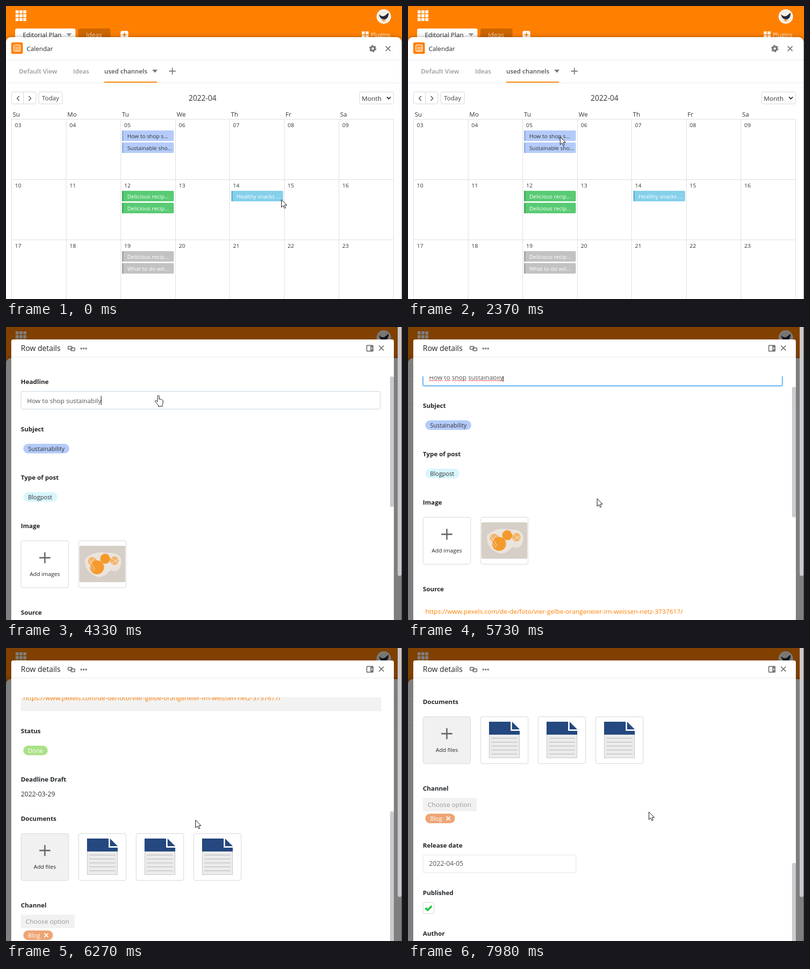
Recreate the animation shown at these times as an HTML page. Size 826 by 612 pixels, loop 8000 ms.

```html
<!DOCTYPE html>
<html lang="en">
<head>
<meta charset="utf-8">
<title>Calendar plugin</title>
<style>
  html, body { margin: 0; width: 100%; height: 100%; overflow: hidden; background: #fff; }
  svg { display: block; font-family: "Open Sans", "Noto Sans", sans-serif; }
  .raised { filter: drop-shadow(0 0 5px rgba(0, 0, 0, .35)); }
</style>
</head>
<body>
<svg id="stage" width="826" height="612" viewBox="0 0 826 612"></svg>
<script>
const ORANGE = '#ff8000', INK = '#212529', GREY = '#777', RULE = '#e9e9e9';

// SVG string helpers
const text = (x, y, s, size = 13, fill = INK, extra = '') =>
  `<text x="${x}" y="${y}" font-size="${size}" fill="${fill}" ${extra}>${s}</text>`;
const rect = (x, y, w, h, fill, r = 0, extra = '') =>
  `<rect x="${x}" y="${y}" width="${w}" height="${h}" rx="${r}" fill="${fill}" ${extra}/>`;
const frame = (x, y, w, h, stroke = '#d4d4d4', r = 3, fill = '#fff', extra = '') =>
  rect(x + .5, y + .5, w - 1, h - 1, fill, r, `stroke="${stroke}" ${extra}`);
const circle = (x, y, r, fill) => `<circle cx="${x}" cy="${y}" r="${r}" fill="${fill}"/>`;
const line = (d, stroke, width = 1, extra = '') =>
  `<path d="${d}" fill="none" stroke="${stroke}" stroke-width="${width}" ${extra}/>`;
const shape = (d, fill, extra = '') => `<path d="${d}" fill="${fill}" ${extra}/>`;
const plus = (x, y, r, stroke, width) => line(`M${x - r} ${y}h${2 * r}M${x} ${y - r}v${2 * r}`, stroke, width);
const cross = (x, y, r, stroke, width) =>
  line(`M${x - r} ${y - r}l${2 * r} ${2 * r}m0 ${-2 * r}l${-2 * r} ${2 * r}`, stroke, width);
const range = n => [...Array(n).keys()];
const grid = (x, y, n, pitch, size, fill) =>
  range(n * n).map(i => rect(x + i % n * pitch, y + Math.floor(i / n) * pitch, size, size, fill)).join('');
const bold = 'font-weight="700"', semi = 'font-weight="600"', medium = 'font-weight="500"';
const centered = 'text-anchor="middle"';

function topBar() {
  return rect(0, 0, 826, 80, ORANGE) + grid(20, 9, 3, 8, 6.4, '#fff') +
    circle(788, 22, 15, '#fff') + circle(788, 22, 13, '#f3ede3') +
    shape('M778 17q7 8 14 2l6-5q0 14-10 14-8 0-10-11z', '#23283a') +
    shape('M783 29q5-3 10 0l-5 4z', '#f0a04b') +
    rect(19, 47, 126, 30, '#fff', 4) + text(35, 65, 'Editorial Plan', 13.2) +
    shape('M126 57h11l-5.5 6.5z', '#999') +
    rect(151, 47, 67, 30, '#cc6600', 4) + text(167, 65, 'Ideas', 13.4, '#ffd9b3') +
    rect(239, 52, 16, 16, '#fff', 3) + plus(247, 60, 4.5, ORANGE, 2) +
    grid(742, 53, 2, 8, 6.5, '#fff3e6') + text(761, 65, 'Plugins', 12.2, '#fff3e6');
}

function calendarEvent(col, y, label, fill, edge, ink = '#fff') {
  const x = Math.round(14 + col * 114);
  return rect(x, y, 108, 22, fill, 2) + rect(x, y, 3, 22, edge, 1) +
    text(x + 11, y + 16, label, 11.45, ink, medium);
}

function calendar() {
  const column = i => Math.round(11 + i * 113.86);
  const days = ['Su', 'Mo', 'Tu', 'We', 'Th', 'Fr', 'Sa'];
  const blue = ['#b4cbfa', '#93aee0', '#333'], green = ['#59cb74', '#41a85a'];
  const grey = ['#c2c2c2', '#a3a3a3'], cyan = ['#85d0ea', '#62b4d0'];
  return topBar() +
    `<g class="raised">${rect(0, 65, 825, 600, '#fff', 10)}</g>` + rect(825, 66, 1, 546, '#8a8a8a') +
    rect(11, 76, 24, 24, ORANGE, 3) +
    frame(16, 81, 14, 14, '#fff', 2, 'none', 'stroke-width="1.6"') + grid(19.5, 85, 3, 3, 1.9, '#fff') +
    text(43, 94, 'Calendar', 13.1) +
    `<circle cx="765" cy="89" r="4.2" fill="none" stroke="${GREY}" stroke-width="3.6"/>` +
    `<circle cx="765" cy="89" r="6.2" fill="none" stroke="${GREY}" stroke-width="2.6" stroke-dasharray="3.25"/>` +
    cross(797, 89, 5, GREY, 1.8) + line('M0 112.5H825M0 160.5H825', RULE) +
    text(27, 141, 'Default View', 13.1, '#999', semi) + text(140, 141, 'Ideas', 13, '#999', semi) +
    text(205, 141, 'used channels', 13, '#555', semi) + shape('M305 133h11l-5.5 6.5z', GREY) +
    plus(347, 136, 7, GREY, 1.8) + rect(205, 158, 110, 2, ORANGE) +
    frame(11, 179, 52, 26) + line('M36.5 180v24', '#d4d4d4') +
    line('M27.5 188l-4.5 5 4.5 5M47.5 188l4.5 5-4.5 5', '#444', 1.4) +
    frame(68, 179, 50, 26) + text(75, 197, 'Today', 13, '#444') +
    text(410, 198, '2022-04', 15.4, '#333', centered) +
    frame(737, 179, 72, 26) + text(742, 198, 'Month', 13.3, '#333') +
    line('M794.5 190l4 4 4-4', '#333', 2) +
    days.map((d, i) => text(column(i) + 3, 231, d, 12.9, '#333')).join('') +
    line(range(8).map(i => `M${column(i) + .5} 236V612`).join('') +
      range(3).map(i => `M11 ${236.5 + i * 126}H809`).join(''), '#dcdcdc') +
    range(21).map(i => text(column(i % 7) + 7.5, 253 + Math.floor(i / 7) * 126,
      String(i + 3).padStart(2, '0'), 11.6, '#333')).join('') +
    calendarEvent(2, 260, 'How to shop s...', ...blue) +
    calendarEvent(2, 285, 'Sustainable sho...', ...blue) +
    calendarEvent(2, 386, 'Delicious recip...', ...green) +
    calendarEvent(2, 411, 'Delicious recip...', ...green) +
    calendarEvent(4, 386, 'Healthy snacks ...', ...cyan) +
    calendarEvent(2, 512, 'Delicious recip...', ...grey) +
    calendarEvent(2, 537, 'What to do wit...', ...grey);
}

function popover() {
  return `<g class="raised">${rect(222, 87, 203, 155, '#fff', 4)}${shape('M316 241h16l-8 8z', '#fff')}</g>` +
    text(238, 113, 'How to shop sustainabily', 12.2, INK, semi) + line('M222 126.5h203', RULE) +
    text(238, 152, '2022-04-05', 12.2, '#555') +
    rect(238, 171, 90, 20, '#b4cbfa', 10) + text(247, 186, 'Sustainability', 11.5) +
    rect(238, 205, 46, 20, '#eda575', 10) + text(248, 219, 'Blog', 11.5, '#fff');
}

const heading = (y, s) => text(31, y, s, 13, INK, bold);
const pill = (y, w, s, fill, ink = '#333', weight = '') =>
  rect(36, y, w, 20, fill, 10) + text(46, y + 15, s, 12.3, ink, weight);
const tile = (x, y, fill) => frame(x, y, 100, 99, '#dfdfdf', 4, fill, 'stroke-width="1.4"');
const addTile = (y, label, fill) => tile(31, y, fill) + plus(81, y + 36, 11.5, '#666', 2.8) +
  text(81, y + 74, label, 11.6, INK, centered);

function documentTile(x, y) {
  return tile(x, y) + `<g transform="translate(${x + 18} ${y + 11})">` +
    frame(0, 20, 64, 56, '#c4c4c4', 0, '#ebebeb') +
    shape('M0 0H45V19H64V27H0z', '#24487f') + shape('M48 0L64 16H48z', '#24487f') +
    line(range(5).map(i => `M5 ${34.5 + i * 8.2}h54`).join(''), '#b0b0b0') + '</g>';
}

function photo() {
  const orange = '#f49a2c';
  return tile(151, 446) + rect(153, 457, 96, 76, '#d6cfc8', 3) +
    shape('M165 484q20-18 45-12 34-2 30 22-4 22-22 14-18 22-36 10-20-12-17-34z', '#ebe4dc') +
    circle(180, 490, 9.5, '#f3b46a') + circle(226, 488, 9, '#f3b46a') +
    circle(207, 484, 10.5, orange) + circle(190, 502, 14.5, orange) +
    line('M168 488l16 22m-12-26l14 22m28-28l24 18m-30 6l28-18M172 500l14-18', '#f3ece5', 1);
}

function squiggle(from, to) {
  const steps = Math.floor((to - from) / 2);
  return `M${from} 162` + range(steps).map(i => `l2 ${i % 2 ? 2 : -2}`).join('');
}

function rowDetails() {
  const link = 'https://www.pexels.com/de-de/foto/vier-gelbe-orangeneier-im-weissen-netz-3737617/';
  return rect(0, 0, 826, 612, 'rgba(0,0,0,.5)') + rect(817, -8, 8, 528, '#c9c9ce', 4) +
    rect(11, 26, 798, 600, '#fff', 4) +
    text(31, 50, 'Row details', 15.6) +
    frame(129, 40, 9, 7, GREY, 1.5, 'none', 'stroke-width="2"') +
    frame(135, 43, 9, 7, GREY, 1.5, 'none', 'stroke-width="2"') +
    [157, 162, 167].map(x => circle(x, 45, 1.9, GREY)).join('') +
    frame(752, 38, 14, 13, GREY, 1, '#fff', 'stroke-width="2"') + rect(760, 38, 6, 13, GREY) +
    shape('M762 42l3 2.5-3 2.5z', '#fff') +
    cross(783, 44, 5, GREY, 1.8) + line('M11 62.5H809', RULE) +
    '<clipPath id="body"><rect x="11" y="103" width="798" height="509"/></clipPath>' +
    '<g clip-path="url(#body)"><g id="content">' +
    heading(119, 'Headline') + frame(31, 134, 750, 38, '#c6d4e0', 2) +
    `<g id="focus">${frame(30, 133, 752, 40, 'rgba(25,145,235,.25)', 3, 'none', 'stroke-width="3"')}` +
    frame(31, 134, 750, 38, '#1991eb', 2) +
    line(squiggle(44, 72) + squiggle(76, 88) + squiggle(92, 122) + squiggle(126, 199), '#e33', 1) + '</g>' +
    text(44, 159, 'How to shop sustainabily', 13.25, '#555') +
    `<rect id="caret" x="198" y="144" width="1" height="19" fill="#000"/>` +
    heading(218, 'Subject') + pill(244, 96, 'Sustainability', '#b4cbfa') +
    heading(319, 'Type of post') + pill(345, 71, 'Blogpost', '#d8f6fe') +
    heading(420, 'Image') + addTile(446, 'Add images', '#fff') + photo() +
    heading(601, 'Source') + `<g id="hover">${rect(31, 624, 752, 47, '#f2f2f2')}</g>` +
    text(36, 648, link, 13.45, ORANGE) +
    heading(717, 'Status') + pill(743, 51, 'Done', '#abe188', '#fff', medium) +
    heading(818, 'Deadline Draft') + text(31, 849, '2022-03-29', 13.7, '#333') +
    heading(900, 'Documents') + addTile(926, 'Add files', '#f1f1f1') +
    [151, 271, 391].map(x => documentTile(x, 926)).join('') +
    heading(1081, 'Channel') + rect(31, 1096, 112, 28, '#f1f1f1') +
    text(41, 1115, 'Choose option', 13.4, '#999') +
    pill(1129, 62, 'Blog', '#eda575', '#fff', medium) + cross(84, 1139, 4, '#fff', 1.8) +
    heading(1200, 'Release date') + frame(31, 1215, 320, 38, '#dfe2e6', 2) +
    text(44, 1238, '2022-04-05', 13.7, '#555') +
    heading(1299, 'Published') + frame(31, 1314, 24, 24, '#d4d4d4', 1) +
    line('M36.5 1326l4.5 4.5 8.5-8.5', '#23c73f', 4) +
    heading(1384, 'Author') + '</g>' +
    `<rect id="thumb" x="801" width="8" height="273" rx="4" fill="#c9cccf"/></g>`;
}

const arrowPath = 'M.5.5V16.5L4.3 13 6.7 18.5 9.2 17.5 6.9 12H11.8z';
const handPath = 'M6 14V2.5a1.75 1.75 0 0 1 3.5 0V9c.6-1 3-.8 3.2.7.8-.8 2.6-.4 2.7.9 1-.5 2.1.2 2.1 1.6V16' +
  'c0 2.5-1.5 3.5-1.5 6V23.5H7.5V21.5C6 19 2.2 15.5 1 13.3c-.6-1.5 1.2-2.4 2.4-1.3z';

stage.innerHTML = calendar() + `<g id="popup">${popover()}</g><g id="details">${rowDetails()}</g>` +
  `<g id="pointer" fill="#fff" stroke="#000"><path id="arrow" d="${arrowPath}"/><path id="hand" d="${handPath}"/></g>`;

const pointerSteps = [
  [0, 574, 404], [1400, 546, 380], [1550, 473, 351], [1700, 393, 326], [1850, 345, 298], [1970, 324, 281],
  [2090, 317, 273], [2980, 317, 232], [3100, 317, 199], [3250, 317, 175], [3370, 310, 153], [3490, 310, 146],
  [3770, 310, 142], [5340, 338, 205], [5460, 374, 292], [5580, 392, 343], [5730, 394, 358], [5850, 395, 359],
  [6940, 460, 346], [7060, 494, 341], [7180, 501, 342], [7980, 502, 342]];
const scrollSteps = [
  [0, 0], [5730, 49], [5850, 160], [6000, 300], [6120, 425], [6270, 539], [6390, 585], [6540, 600],
  [7180, 660], [7300, 745], [7420, 783]];
const stepAt = (steps, t) => steps.findLast(s => s[0] <= t);
const el = id => document.getElementById(id);
const show = (id, on) => el(id).setAttribute('visibility', on ? 'inherit' : 'hidden');

function draw() {
  const t = performance.now() % 8000;
  const [, x, y] = stepAt(pointerSteps, t), scroll = stepAt(scrollSteps, t)[1];
  const isHand = t >= 3370 && t < 5340;
  show('popup', t >= 2670 && t < 4330);
  show('details', t >= 4330);
  show('focus', t >= 4480);
  show('caret', t < 4880 || t >= 5340);
  show('hover', scroll > 100);
  show('arrow', !isHand);
  show('hand', isHand);
  el('content').setAttribute('transform', `translate(0 ${-scroll})`);
  el('thumb').setAttribute('y', 103 + scroll / 2.264);
  el('pointer').setAttribute('transform', `translate(${x} ${y})`);
  requestAnimationFrame(draw);
}
draw();
</script>
</body>
</html>
```
